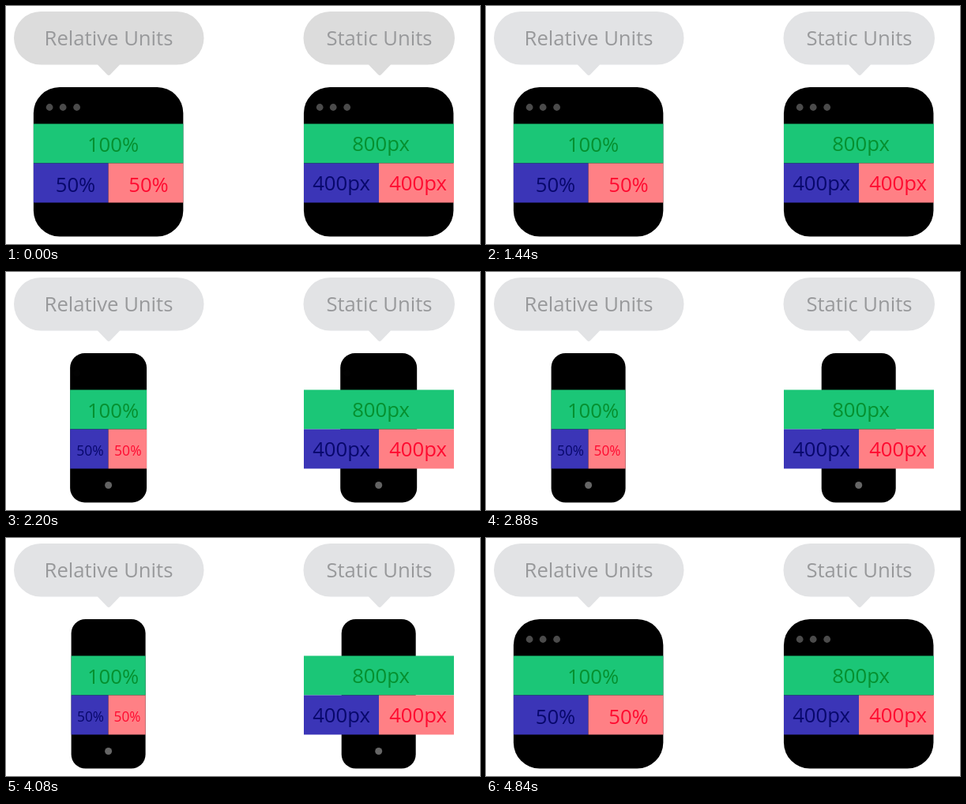
These frames come from a looping animation (600x302 px, 4.88 s). An HTML page:

```html
<!DOCTYPE html>
<html lang="en">
<head>
<meta charset="utf-8">
<title>Relative and static units</title>
<style>
  html, body { margin: 0; height: 100%; overflow: hidden; background: #fff; }
  svg { display: block; width: 600px; height: 302px; }
  text { font: 25.7px "Open Sans", Lato, sans-serif; text-anchor: middle; }
</style>
</head>
<body>
<svg id="stage" viewBox="0 0 600 302"></svg>
<script>
const LOOP = 4880, TOP = 103, SIZE = 189.5;
const GREEN = ['#1bc677', '#06902f'], BLUE = ['#3b35b7', '#08086c'], PINK = ['#ff8085', '#ff0a30'];
const stage = document.getElementById('stage');

function add(tag, attrs, label) {
  const el = document.createElementNS('http://www.w3.org/2000/svg', tag);
  set(el, attrs);
  if (label) el.textContent = label;
  stage.appendChild(el);
  return el;
}
function set(el, attrs) {
  for (const k in attrs) el.setAttribute(k, attrs[k]);
}
const mix = (a, b, p) => a + (b - a) * p;
const ease = u => (1 - Math.cos(Math.PI * Math.min(1, Math.max(0, u)))) / 2;

function bubble(x, w, tip, label, textX) {
  const shape = add('path', {
    d: `M${x + 34} 7H${x + w - 34}a34 33.75 0 0 1 0 67.5H${tip + 14}` +
       `L${tip + 2} 87q-2 2 -4 0L${tip - 14} 74.5H${x + 34}a34 33.75 0 0 1 0-67.5z`
  });
  add('text', { x: textX, y: 50, fill: '#98999b' }, label);
  return shape;
}

function device(cx) {
  const body = add('rect', { y: TOP, height: SIZE });
  const dots = [-74.5, -57.5, -40].map(dx =>
    add('circle', { cx: cx + dx, cy: 128.5, r: 4.4, fill: '#4b4b4b' }));
  const home = add('circle', { cx, cy: 270.5, r: 4.5, fill: '#666' });
  return p => {
    const w = mix(SIZE, 94, p);
    set(body, { x: cx - w / 2, width: w, rx: mix(33, 18, p) });
    for (const dot of dots) {
      const inside = +dot.getAttribute('cx') - 4.4 > cx - w / 2;
      set(dot, { opacity: inside ? 1 - p : 0 });
    }
    set(home, { opacity: p });
  };
}

const box = (y, [fill]) => add('rect', { y, height: y < 200 ? 50 : 50.5, fill });
const word = (x, y, [, fill], label) => add('text', { x, y, fill }, label);

const bubbles = [
  bubble(10, 240.5, 130, 'Relative Units', 130),
  bubble(376.5, 191.5, 473, 'Static Units', 472.5)
];
const devices = [device(129.6), device(471.7)];

// Fluid layout: follows the width of its device
const fluid = [box(149.5, GREEN), box(199.5, BLUE), box(199.5, PINK)];
word(135.5, 185, GREEN, '100%');
const halves = [word(88, 236, BLUE, '50%'), word(180.5, 236, PINK, '50%')];

// Fixed layout: keeps its size
set(box(149.5, GREEN), { x: 377, width: 190 });
set(box(199.5, BLUE), { x: 377, width: 95 });
set(box(199.5, PINK), { x: 472, width: 95 });
word(474.5, 183.5, GREEN, '800px');
word(424.5, 234, BLUE, '400px');
word(521.5, 234, PINK, '400px');

function draw(t) {
  const p = ease((t - 1580) / 700) - ease((t - 4100) / 700);
  const w = mix(SIZE, 94, p), left = 129.6 - w / 2;
  devices.forEach(d => d(p));
  bubbles.forEach(b => set(b, { fill: t < 360 ? '#dcdcdc' : '#e2e3e5' }));
  set(fluid[0], { x: left, width: w });
  set(fluid[1], { x: left, width: w / 2 });
  set(fluid[2], { x: 129.6, width: w / 2 });
  halves.forEach((el, i) => {
    set(el, { x: mix([88, 180.5][i], [107, 153.5][i], p), y: mix(236, 233, p) });
    el.style.fontSize = mix(25.7, 17.3, p) + 'px';
  });
}

const start = performance.now();
function tick() {
  draw((performance.now() - start) % LOOP);
  requestAnimationFrame(tick);
}
tick();
</script>
</body>
</html>
```
